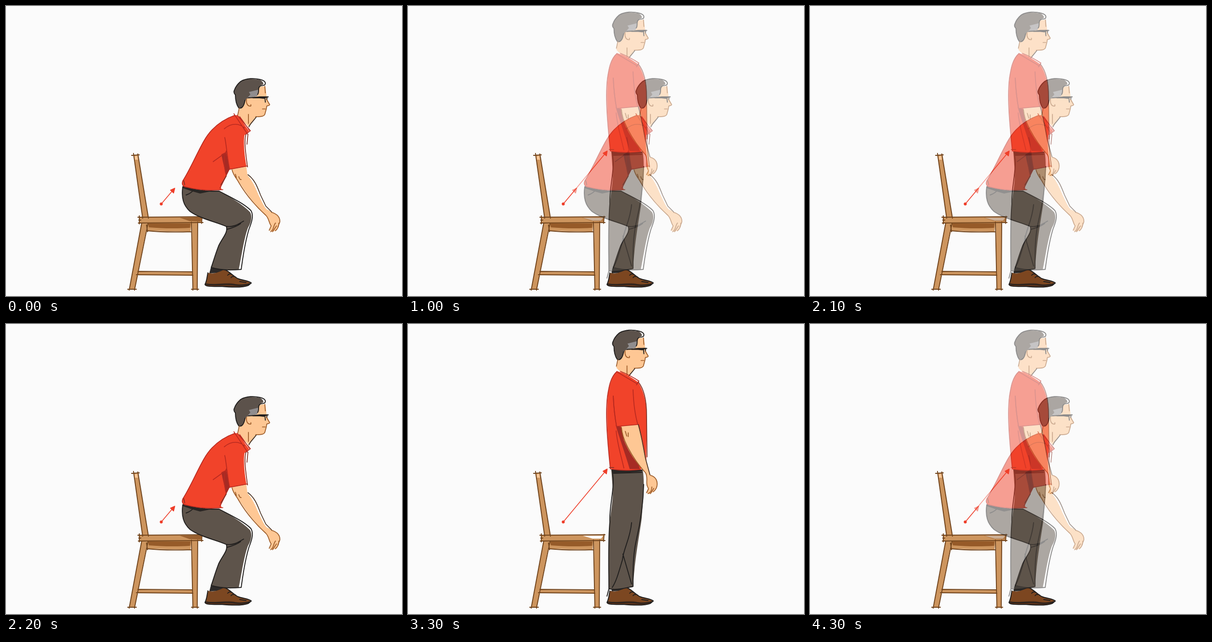
Animation of 820 by 600 pixels, one loop 4.4 s. Source, as an HTML page:

```html
<!DOCTYPE html>
<html lang="en">
<head>
<meta charset="utf-8">
<title>Rising from a chair</title>
<style>
  html, body { margin: 0; width: 100%; height: 100%; overflow: hidden; background: #fbfbfb; }
  svg { display: block; width: 820px; height: 600px; }
  path { stroke-linecap: round; stroke-linejoin: round; }
  .line { fill: none; stroke-width: 1.7; }
  .ink { stroke: #211f1e; stroke-width: 1.9; }
  .wood { stroke: #70431b; stroke-width: 1.9; }
  .flesh { stroke: #9b5a27; }
  .seam { stroke: #b82a20; }
  .skin { fill: #fec794; }
  .shirt { fill: #f1432a; }
  .shade { fill: #a62b24; }
  .cloth { fill: #5e544b; }
  .white { fill: #fff; }
  .arrow { fill: #ee3d29; stroke: #ee3d29; stroke-width: 1.6; }
  /* Standing pose: hidden, half blended, shown, half blended */
  #standing { animation: rise 2200ms step-end infinite; }
  @keyframes rise {
    0% { opacity: 0; }
    45.4545% { opacity: .5; }
    50% { opacity: 1; }
    95.4545% { opacity: .5; }
  }
</style>
</head>
<body>
<svg viewBox="0 0 820 600" xmlns="http://www.w3.org/2000/svg">
  <defs>
    <g id="chair">
      <g fill="#cd955e">
        <path d="M264 309L273 308L295 437H283Z"/>
        <path d="M281 449L293 450L266 586H256Z"/>
        <path d="M385 447H397L396 586H387Z"/>
        <path d="M274 550L386 551V557L272 556Z"/>
        <path d="M292 449H384L382 467L293 465Z"/>
        <path d="M276 437L407 436L405 448L276 449Z"/>
      </g>
      <path fill="#f8c797" d="M266 311L272 310L273 318H267Z"/>
      <path fill="#965b29" d="M294 450H382L381 459C350 461 320 460 296 458Z"/>
      <path class="line wood" d="M260 309L276 308M264 305L283 439M273 306L295 439
        M273 437L408 436M274 449L408 448M276 434V451M406 435L405 450
        M281 449L255 588M294 450L266 588M252 586H270M384 447L387 588M397 447L396 588M384 586H399
        M273 549L386 550M270 556L387 557M292 465C320 468 350 468 384 467M275 443H279M291 453L293 467"/>
    </g>

    <g id="head">
      <path class="skin" d="M486 204L480 228C486 235 496 243 503 250C508 243 514 237 518 230C526 229 533 229 536 225L539 214L540 207L546 204L540 190L537 166L524 167L497 190Z"/>
      <path fill="#5c524b" d="M486 156C494 151 508 150 520 152C528 152 533 157 533 162C528 164 525 165 524 169C522 176 521 181 520 186C512 189 504 190 498 192C494 198 492 205 487 212L482 211C477 204 475 196 475 184C472 181 471 178 473 174C475 167 480 160 486 156Z"/>
      <path fill="#908d8e" d="M503 178L523 173L520 187L500 190L506 183Z"/>
      <path class="line ink" d="M486 156C498 149 514 149 526 152C535 154 539 158 536 163C532 166 528 163 525 167C521 171 525 178 521 183M486 156C479 162 475 168 473 174C471 178 472 181 475 184C475 196 477 204 482 211C489 213 493 206 495 195"/>
      <path class="line flesh" d="M498 193C497 201 500 207 505 207Q508 208 507 204M536 166L537 180M540 194L546 204C545 207 541 206 540 207L539 213L536 224C534 229 526 229 517 229M531 213H537M483 211L480 225M502 224V243"/>
      <path class="line" stroke="#3a2c23" d="M518 230C512 238 506 243 503 250"/>
      <path class="line ink" d="M502 190L525 189L543 188M536 188L537 199M541 188L540 193"/>
      <path fill="#211f1e" d="M511 189L525 187L541 187V189L534 192L525 191L511 191Z"/>
    </g>

    <g id="shoe">
      <path fill="#2d2a29" d="M425 538L449 541L452 552L421 553Z"/>
      <path fill="#7c4721" d="M418 552C427 555 437 553 452 545C461 547 468 557 479 563C491 567 503 569 507 574C501 581 487 582 474 581C453 580 431 581 413 578C415 570 416 561 418 552Z"/>
      <path fill="#56311b" d="M413 575C437 577 457 571 475 575C486 577 499 575 506 575C495 583 475 582 460 581L414 579Z"/>
      <path class="line ink" d="M418 552C416 561 416 569 412 576C413 580 423 581 445 580C467 582 490 583 502 578L508 573C502 568 490 568 480 564C469 558 461 547 451 545M413 575C433 579 455 573 474 577C486 579 497 577 507 574M459 557Q463 552 469 556M466 562Q470 557 476 561M484 570L497 572"/>
    </g>
    <circle id="dot" class="arrow" cx="321.5" cy="409.5" r="2.3"/>
  </defs>

  <rect width="820" height="600" fill="#fbfbfb"/>

  <g id="rising">
    <use href="#chair"/>
    <path fill="#99602f" d="M360 438L406 437L404 446L380 445Z"/>
    <use href="#dot"/>
    <path class="arrow" d="M322 409L344 383M349.5 377L340.5 381L347 387Z"/>
    <use href="#shoe"/>

    <path class="white" d="M441 383L506 424L510 434L487 545H480Z"/>
    <path class="cloth" d="M366 373C362 395 367 412 381 425C400 440 430 447 456 456C460 468 447 480 440 495C433 515 428 530 425 541C440 546 465 547 482 545C488 515 493 480 501 459C509 446 510 433 505 426C488 409 465 396 441 382C420 383 390 380 366 373Z"/>
    <path class="line ink" d="M366 374C363 397 367 412 381 425C402 440 431 445 456 456M367 374C390 382 418 384 441 383C464 395 492 408 507 423C514 434 508 449 503 462C497 482 491 515 487 545M456 456C461 468 447 481 440 497C433 515 429 530 425 541C441 546 465 547 487 545M456 456C471 458 480 452 492 445M458 462Q477 457 486 450M373 391Q383 388 390 379M412 378L410 384"/>
    <path fill="#292624" d="M367 373C382 380 407 382 426 383L402 388C390 385 378 381 367 377Z"/>

    <path class="white" d="M500 349L517 364L528 392L540 418L551 429L543 429L508 369Z"/>
    <path class="skin" d="M464 335L497 328L500 350C511 362 517 377 523 391C530 405 534 415 540 421C550 425 561 430 565 438C569 448 565 452 564 457L558 465L551 467L545 464L549 456C544 450 544 441 538 433C518 415 499 389 486 369C475 356 470 349 468 338Z"/>
    <path class="line flesh" d="M468 339C471 351 478 357 482 365C496 389 515 412 538 433C545 440 544 448 549 455L545 464M548 467C555 464 553 455 558 449M552 467L560 455M558 465C564 460 565 454 565 449M550 427C562 430 568 438 567 447L563 457M475 348L477 355M482 353Q484 360 487 359"/>
    <path class="line" stroke="#493224" d="M501 349C516 360 521 376 527 391L538 414L550 426"/>

    <use href="#head"/>
    <path class="white" d="M493 263L502 262L499 286L501 332L494 332Z"/>
    <path class="shirt" d="M474 226C446 236 424 254 410 279C395 305 382 337 366 362C363 370 366 374 374 375C395 380 420 382 447 380C441 372 450 362 456 352L463 338L498 332C494 310 491 282 494 267L499 264L503 258C494 247 487 234 478 226Z"/>
    <path class="shade" d="M446 307L456 302L463 338L456 352C453 337 449 323 446 307Z"/>
    <path class="line seam" d="M474 226C446 236 424 254 410 279C395 305 382 337 366 362C363 370 367 374 375 375C397 381 425 382 449 380M453 272C457 290 458 315 463 338L500 331M429 322L457 302M456 300C448 320 454 342 456 351L443 377M452 254C469 240 484 244 494 252M472 223L500 265M479 226L506 258L498 264M484 229L504 257"/>
    <path class="line" stroke="#803025" d="M497 265C492 280 497 308 500 333M501 265L499 286M368 361L370 370M456 352L445 370"/>
  </g>

  <g id="standing">
    <rect width="820" height="600" fill="#fbfbfb"/>
    <use href="#chair"/>
    <path class="white" d="M362 438H404L400 444H382Z"/>
    <use href="#dot"/>
    <path class="arrow" d="M322 409L406 308M412.5 300L404 304.5L411 310Z"/>
    <use href="#shoe"/>

    <path class="cloth" d="M421 301H486C491 330 486 370 484 401C480 434 470 480 466 544C448 548 430 550 416 548C414 515 415 474 417 438C416 396 428 363 423 329Z"/>
    <path class="line ink" d="M422 301C431 333 416 376 418 409C414 455 416 505 416 548C435 551 451 546 466 543M488 332C487 374 481 412 473 446C465 480 466 516 466 543M463 411C460 445 446 465 444 488C436 515 431 533 423 545M445 476L463 538M423 304H484M416 548L412 563M424 309L484 307"/>
    <path fill="#292624" d="M422 301H484V305L423 310Z"/>

    <use href="#head" x="-48.5" y="-137.5"/>
    <path class="shirt" d="M434 98C422 107 417 127 414 147C410 183 413 239 419 299C441 304 463 303 481 301L494 290C492 257 496 225 494 187C493 158 488 138 476 120C462 110 448 101 434 98Z"/>
    <path class="shade" d="M430 209L442 214C447 245 460 266 477 289L480 300H459C450 269 439 240 430 209Z"/>
    <path class="line seam" d="M433 98C419 110 416 130 413 150C408 190 414 250 419 300C443 304 461 303 482 301M425 149C426 171 428 192 432 211M434 100L475 124L478 118M440 98Q460 106 478 118L473 126M431 221C433 246 441 272 447 298"/>
    <path class="line" stroke="#803025" d="M477 120C489 135 494 158 494 188L495 275M417 297H426"/>

    <path class="skin" d="M441 208L475 204C481 225 486 248 491 270C494 287 497 301 502 313C512 315 517 324 516 333C514 340 512 344 508 347L500 352L494 349L498 341L494 333C495 325 495 317 492 307C472 288 456 263 447 240Z"/>
    <path class="shirt" d="M426 145C427 128 461 126 467 145C469 169 471 189 476 208L432 212Z"/>
    <path class="line seam" d="M425 149C426 171 428 192 432 212L476 208M466 136C467 164 469 185 476 208"/>
    <path class="line flesh" d="M442 214C443 229 448 241 454 253C466 276 478 293 492 308C497 317 493 326 495 334L498 341L494 349M497 351Q505 348 505 337M502 351L509 340M508 347Q516 341 516 331Q516 317 502 313M450 222L453 232M456 225V233"/>
    <path class="line" stroke="#493224" d="M477 208C485 237 488 260 492 279L501 312"/>
  </g>
</svg>
</body>
</html>
```
